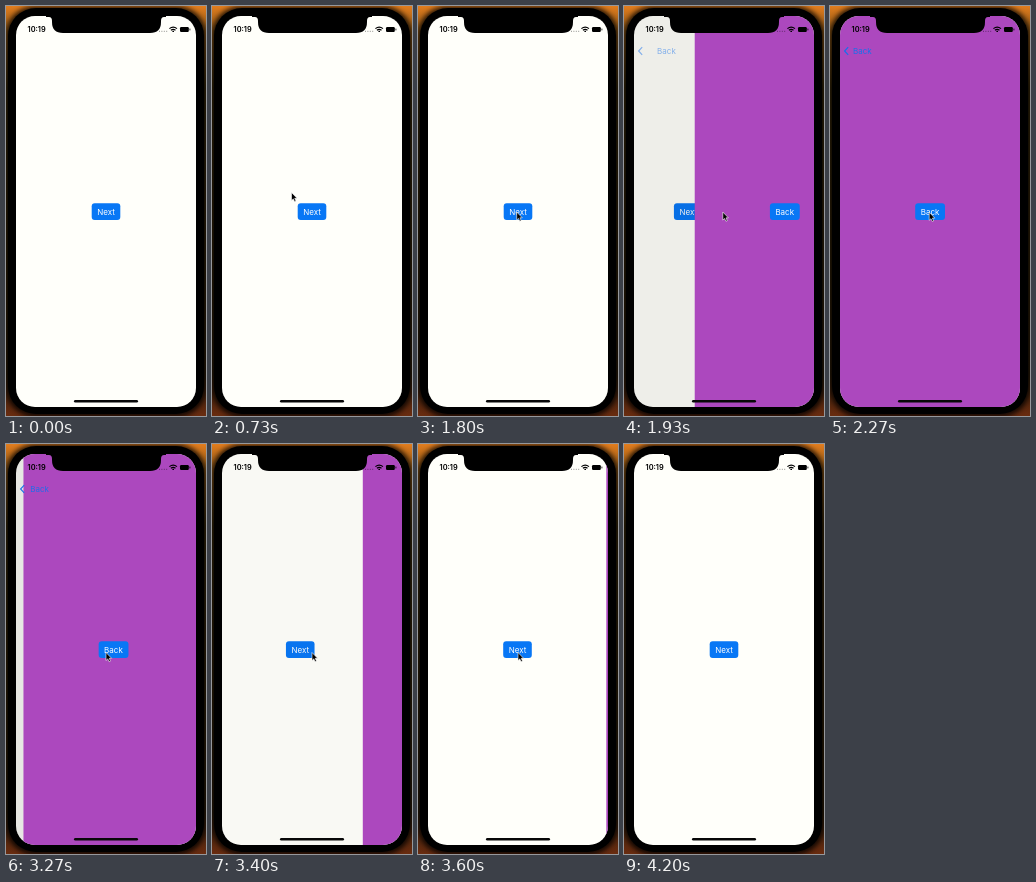
Write an HTML page that moves like this. It is 200 by 410 pixels and loops after 4.99 s.

```html
<!DOCTYPE html>
<html lang="en">
<head>
<meta charset="utf-8">
<title>Push and pop navigation</title>
<style>
  html, body { margin: 0; width: 100%; height: 100%; overflow: hidden; background: #000; }
  svg { display: block; width: 200px; height: 410px; }
  text { font-family: Inter, "Liberation Sans", sans-serif; }
  .label { font-size: 8px; fill: #fff; text-anchor: middle; }
  .nav { font-size: 8px; fill: #1670ec; }
  .clock { font-size: 7.4px; font-weight: 600; }
</style>
</head>
<body>
<svg viewBox="0 0 200 410">
  <defs>
    <linearGradient id="desk" x2="0" y2="1">
      <stop offset="0" stop-color="#e27d1e"/>
      <stop offset=".06" stop-color="#8a5414"/>
      <stop offset=".2" stop-color="#3a2a0a"/>
      <stop offset=".9" stop-color="#2c1c08"/>
      <stop offset="1" stop-color="#6a2c10"/>
    </linearGradient>
    <filter id="soft" x="-10%" y="-10%" width="120%" height="120%">
      <feGaussianBlur stdDeviation="2.5"/>
    </filter>
    <clipPath id="glass"><rect x="10" y="10" width="180" height="391" rx="19"/></clipPath>
  </defs>

  <rect width="200" height="410" fill="url(#desk)"/>
  <rect x="0" y="0" width="200" height="411" rx="29" opacity=".8" filter="url(#soft)"/>
  <rect x="2" y="2" width="196" height="406" rx="28"/>

  <g clip-path="url(#glass)">
    <rect x="10" y="10" width="180" height="391" fill="#fffffa"/>
    <g id="first">
      <rect x="85.7" y="197.3" width="28.6" height="16.6" rx="3" fill="#0877f5"/>
      <text class="label" x="100" y="208.5">Next</text>
    </g>
    <rect id="dim" x="10" y="10" width="180" height="391" opacity="0"/>
    <g id="second">
      <rect x="10" y="10" width="180" height="391" fill="#ac48be"/>
      <rect x="85.2" y="197.3" width="29.8" height="16.6" rx="3" fill="#0877f5"/>
      <text class="label" x="100" y="208.5">Back</text>
    </g>
    <g id="bar" opacity="0">
      <path d="M18.2 41.2 14.6 45l3.6 3.8" fill="none" stroke="#1670ec" stroke-width="1.2"/>
      <text id="barText" class="nav" x="23" y="48">Back</text>
    </g>
    <text class="clock" x="21.5" y="26.2">10:19</text>
    <path d="M153 25.3h9" stroke="#000" stroke-opacity=".45" stroke-width="1" stroke-dasharray="1 1.4"/>
    <g fill="none" stroke="#000" stroke-width="1.2">
      <path d="M163.4 22.6q3.8-3 7.6 0M164.9 24.3q2.3-1.8 4.6 0"/>
      <path d="M166.4 25.4h1.6"/>
    </g>
    <rect x="174" y="21" width="8.8" height="5" rx="1.2"/>
    <path d="M183.9 22.6v1.8" stroke="#000" stroke-width=".8"/>
    <rect x="68" y="394" width="64" height="2.4" rx="1.2" fill="#080808"/>
  </g>

  <path d="M40 9h120v2h-2q-3 0-3 4v1q0 11-11 11H57q-11 0-11-11v-1q0-4-3-4h-3z"/>
  <path id="cursor" d="M0 0v8l1.8-1.6 1.3 2.8 1.4-.6-1.3-2.8h2.4z" stroke="#fff" stroke-width=".6"/>
</svg>
<script>
  const LOOP = 4990, STEP = 200 / 3, LAST = 4200;
  const WIDTH = 180, PUSH = 1815, POP = 3250, SPEED = 0.0192;
  // time, x, y of the pointer tip
  const path = [
    [330, -10, 120], [530, 45, 160], [730, 79.5, 186.5], [1330, 80, 188],
    [1600, 96, 203], [1800, 98.7, 206], [2270, 99.2, 206.3], [2930, 99.2, 206.3],
    [3200, 100, 208.5], [3950, 100, 208.5], [4060, 130, 255], [4200, 206, 330]
  ];
  const $ = id => document.getElementById(id);
  const move = (el, x, y = 0) => el.setAttribute("transform", `translate(${x} ${y})`);

  // critically damped spring that settles once it is within a pixel
  function spring(ms) {
    const k = Math.max(0, ms) * SPEED;
    const value = 1 - (1 + k) * Math.exp(-k);
    return value > 0.996 ? 1 : value;
  }

  function pointer(t) {
    const i = path.findIndex(p => p[0] > t);
    if (i < 0) return path[path.length - 1].slice(1);
    if (i === 0) return path[0].slice(1);
    const [t0, x0, y0] = path[i - 1], [t1, x1, y1] = path[i];
    const u = (t - t0) / (t1 - t0), e = u * u * (3 - 2 * u);
    return [x0 + (x1 - x0) * e, y0 + (y1 - y0) * e];
  }

  function draw(time) {
    const t = Math.min(LAST, Math.floor((time + 4) / STEP) * STEP);
    const open = t >= POP ? 1 - spring(t - POP) : spring(t - PUSH);
    move($("first"), -0.3 * WIDTH * open);
    move($("second"), WIDTH * (1 - open));
    $("dim").setAttribute("opacity", 0.1 * open);
    $("bar").setAttribute("opacity", Math.max(0, open * 1.5 - 0.5));
    move($("barText"), 30 * (1 - open));
    move($("cursor"), ...pointer(t));
  }

  const start = performance.now();
  function tick() {
    draw((performance.now() - start) % LOOP);
    requestAnimationFrame(tick);
  }
  tick();
</script>
</body>
</html>
```
